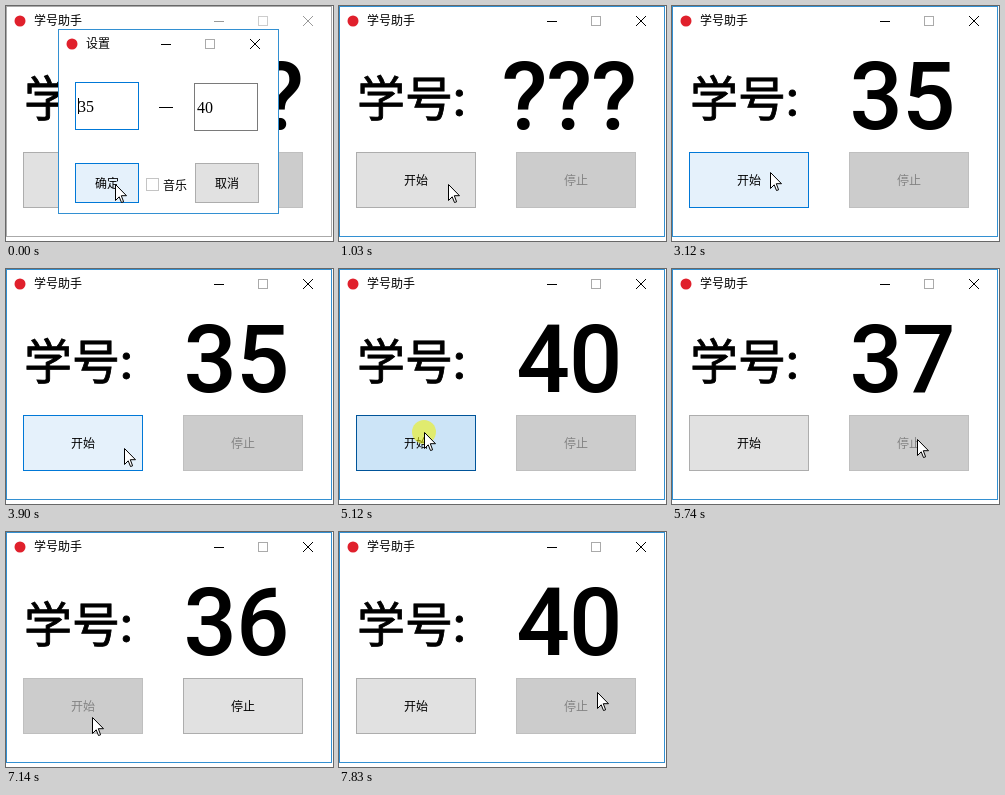
Recreate the animation shown at these times as an HTML page. Size 327 by 235 pixels, loop 8.38 s.

```html
<!DOCTYPE html>
<html lang="zh-CN">
<head>
<meta charset="utf-8">
<title>学号助手</title>
<style>
html, body { margin: 0; width: 100%; height: 100%; overflow: hidden; background: #fff; }
svg { display: block; width: 327px; height: 235px; }
text { font: 500 12px "Noto Sans CJK SC", "Noto Sans CJK", "Noto Sans CJK JP", sans-serif; fill: #000; }
rect, .icons path { shape-rendering: crispEdges; }
.icons path { fill: none; stroke: #000; }
.icons .cross { shape-rendering: auto; }
.icons .max { stroke: #aaa; }
.idle .icons path { stroke: #999; }
.idle .icons .max { stroke: #ccc; }
.frame { fill: #fff; stroke: #3390d2; }
.idle .frame { stroke: #aaa; }
.btn text { text-anchor: middle; }
.btn rect { fill: #e1e1e1; stroke: #adadad; }
.btn.hover rect { fill: #e5f1fb; stroke: #0078d7; }
.btn.down rect { fill: #cce4f7; stroke: #005499; }
.btn.off rect { fill: #ccc; stroke: #bfbfbf; }
.btn.off text { fill: #838383; }
#label { font-family: Roboto, "Noto Sans CJK SC", sans-serif; font-size: 48px; stroke: #000; stroke-width: .8px; }
#number { font: 500 94px Roboto, sans-serif; letter-spacing: -1px; text-anchor: middle; }
.field { font: 16px "Liberation Serif", serif; }
#dialog { transform-origin: 162px 115px; }
</style>
</head>
<body>
<svg viewBox="0 0 327 235">
  <g id="main"></g>
  <g id="dialog"></g>
  <g id="pointer">
    <circle id="halo" r="12" fill="#f0f000" fill-opacity=".55"/>
    <path d="M.5 .5V16.5L4.2 12.8L6.5 18.5L8.6 17.8L6.3 11.7H11.5Z" fill="#fff" stroke="#000"/>
  </g>
</svg>
<script>
const LOOP = 8380, STEP = 80;
const REST = 150, MOVE = 380; // pause before a click, longest travel
const $ = id => document.getElementById(id);

const box = (x, y, w, h, attrs = '') =>
  `<rect x="${x + .5}" y="${y + .5}" width="${w - 1}" height="${h - 1}" ${attrs}/>`;
const label = (x, y, s, attrs = '') => `<text x="${x}" y="${y}" ${attrs}>${s}</text>`;
const button = (id, x, y, w, h, s) =>
  `<g id="${id}" class="btn">${box(x, y, w, h)}${label(x + w / 2, y + h / 2 + 5, s)}</g>`;

function windowFrame(x, y, w, h, title) {
  const r = x + w, m = y + 15;
  return box(x, y, w, h, 'class="frame"') +
    `<circle cx="${x + 14}" cy="${m}" r="5.5" fill="#e0202c"/>` +
    label(x + 28, y + 19, title) +
    `<g class="icons"><path d="M${r - 118} ${m + .5}h10"/>
     <path class="max" d="M${r - 73.5} ${m - 4.5}h9v9h-9z"/>
     <path class="cross" d="M${r - 29} ${m - 5}l10 10m0 -10l-10 10"/></g>`;
}

$('main').innerHTML = windowFrame(0, 0, 326, 231, '学号助手') +
  label(18, 110, '学号:', 'id="label"') +
  label(230, 123, '', 'id="number"') +
  button('start', 17, 146, 120, 56, '开始') +
  button('stop', 177, 146, 120, 56, '停止');

$('dialog').innerHTML = windowFrame(52, 23, 221, 185, '设置') +
  box(69, 76, 64, 48, 'fill="#fff" stroke="#0078d7"') +
  box(188, 77, 64, 48, 'fill="#fff" stroke="#7a7a7a"') +
  label(72, 106, '35', 'class="field"') +
  label(191, 107, '40', 'class="field"') +
  '<rect id="caret" x="72" y="92" width="1" height="16"/>' +
  '<rect x="153" y="101" width="14" height="1"/>' +
  button('ok', 69, 157, 64, 40, '确定') +
  button('cancel', 189, 157, 64, 40, '取消') +
  box(140, 172, 13, 13, 'fill="#fff" stroke="#c4c4c4"') +
  label(157, 184, '音乐');

// The dialog is confirmed first, then start and stop take turns.
const click = (down, x, y, hold = STEP) => ({ down, x, y, up: down + hold });
const clicks = [
  click(700, 109, 178),
  click(2010, 85, 174, 150), click(2640, 245, 170),
  click(3200, 98, 166), click(3580, 245, 170),
  click(3980, 118, 179), click(4360, 245, 170, 150),
  click(5120, 85, 163), click(5600, 245, 170),
  click(6050, 90, 172), click(6590, 248, 162),
  click(6970, 86, 185), click(7680, 258, 160, 150)
];
const drawn = [35, 35, 40, 37, 39, 40];

const clamp = v => Math.min(1, Math.max(0, v));
const ease = p => p * p * (3 - 2 * p);
const roll = n => 35 + Math.floor(Math.abs(Math.sin(n * 12.9898) * 43758.5) % 6);
const setState = (id, s) => $(id).setAttribute('class', 'btn ' + s);

function pointerAt(t, last, next) {
  if (!last || !next) return last || next;
  const end = next.down - REST, begin = Math.max(last.up, end - MOVE);
  const e = ease(clamp((t - begin) / (end - begin)));
  const mix = (a, b) => Math.round(a + (b - a) * e);
  return { x: mix(last.x, next.x), y: mix(last.y, next.y) };
}

function drawDialog(t, { down, up }) {
  const fade = 1 - clamp((t - up) / 220);
  $('dialog').style.opacity = fade;
  $('dialog').style.transform = `scale(${.9 + .1 * fade})`;
  $('caret').style.opacity = t < 150 || t >= down ? 1 : 0;
  setState('ok', t >= down && t < up ? 'down' : 'hover');
  $('main').setAttribute('class', t < up + STEP ? 'idle' : '');
}

function draw(t) {
  const i = clicks.filter(c => c.down <= t).length - 1;
  const last = clicks[i];
  const pressed = !!last && t < last.up;
  const starting = i > 0 && i % 2 === 1, stopping = i > 0 && !starting;
  const running = starting ? !pressed : stopping && pressed;

  const frame = last ? Math.floor((t - last.down) / STEP) : 0;
  const { x, y } = pointerAt(last ? last.down + frame * STEP : 0, last, clicks[i + 1]);
  const hover = left => t >= 1100 && x >= left && x < left + 120 ? 'hover' : '';

  drawDialog(t, clicks[0]);
  const rolling = starting && t >= last.up + 70;
  $('number').textContent = rolling ? roll(i * 20 + frame) : drawn[(i >> 1) - 1] || '???';
  setState('start', running ? 'off' : starting ? 'down' : hover(17));
  setState('stop', !running ? 'off' : stopping ? 'down' : hover(177));
  $('halo').style.opacity = pressed ? 1 : 0;
  $('pointer').setAttribute('transform', `translate(${x} ${y})`);
}

const begin = performance.now();
function tick() {
  draw((performance.now() - begin) % LOOP);
  requestAnimationFrame(tick);
}
tick();
</script>
</body>
</html>
```
